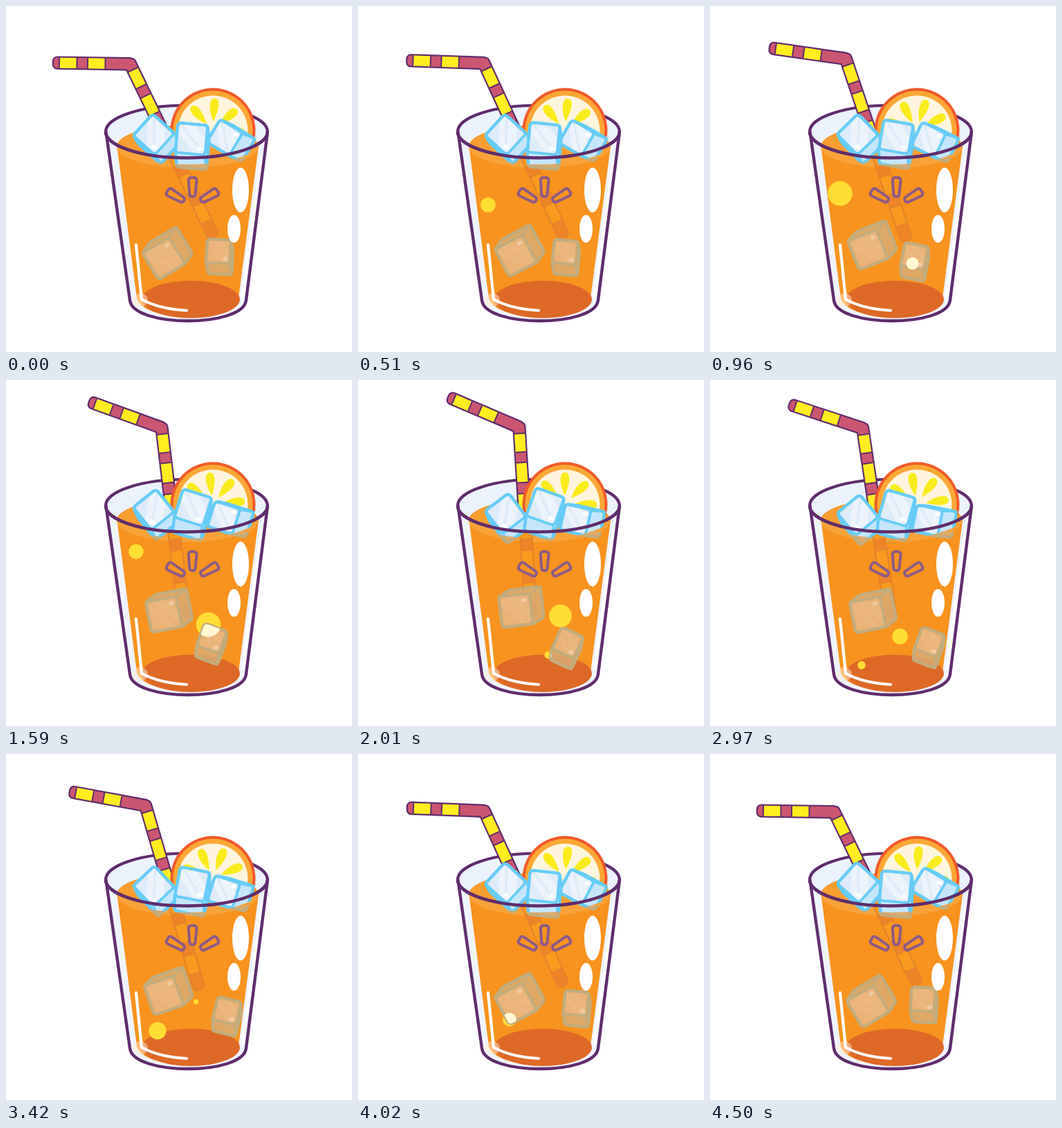
Animation, 500 px wide and 500 px high, one loop 4.53 s. Source, as an HTML page with a canvas:

```html
<!DOCTYPE html>
<html lang="en">
<head>
<meta charset="utf-8">
<title>Iced orange drink</title>
<style>
html, body { margin: 0; width: 100%; height: 100%; overflow: hidden; background: #fff; }
canvas { display: block; width: 500px; height: 500px; }
</style>
</head>
<body>
<canvas id="stage" width="500" height="500"></canvas>
<script>
const ctx = document.getElementById('stage').getContext('2d');
const LOOP = 4530, TAU = Math.PI * 2, DEG = Math.PI / 180;
const PURPLE = '#5f2d6c';
const STRAW_DRY = { line: PURPLE, red: '#cb5671', yellow: '#ffee1f' };
const STRAW_WET = { line: '#e5842b', red: '#ee8328', yellow: '#f89b1f' };
const ICE_DRY = { side: '#c5e6fa', front: '#deebf8', line: '#66ccf6', stripe: .4, glint: 1 };
const ICE_WET = { side: 'rgba(217,174,120,.8)', front: 'rgba(240,184,128,.7)', line: '#c3ac7c', stripe: .05, glint: .3 };

const mix = (a, b, k) => a + (b - a) * k;
const smoother = u => {
  u = Math.min(1, Math.max(0, u));
  return u * u * u * (10 + u * (6 * u - 15));
};
// 0 until start, 1 at peak, 0 again from end
const swing = (t, start, peak, end) =>
  t < peak ? smoother((t - start) / (peak - start)) : smoother((end - t) / (end - peak));

function at(x, y, deg, draw) {
  ctx.save();
  ctx.translate(x, y);
  ctx.rotate(deg * DEG);
  draw();
  ctx.restore();
}
function clipped(path, draw) {
  ctx.save();
  ctx.clip(path);
  draw();
  ctx.restore();
}
function oval(x, y, rx, ry, fill) {
  ctx.fillStyle = fill;
  ctx.beginPath();
  ctx.ellipse(x, y, rx, ry, 0, 0, TAU);
  ctx.fill();
}
function stroke(path, color, width) {
  ctx.strokeStyle = color;
  ctx.lineWidth = width;
  ctx.stroke(path);
}
function roundPoly(pts, r) {
  const p = new Path2D(), n = pts.length, last = pts[n - 1];
  p.moveTo((last[0] + pts[0][0]) / 2, (last[1] + pts[0][1]) / 2);
  pts.forEach((c, i) => p.arcTo(...c, ...pts[(i + 1) % n], r));
  p.closePath();
  return p;
}

const glass = new Path2D('M144.5 182 L179 425 C183 465 343 465 347 425 L378 182');
const glassBody = new Path2D('M144.5 182 L179 425 C183 465 343 465 347 425 L378 182 A117 38 0 0 1 144.5 182Z');
const liquid = new Path2D('M160.5 203 L189 422 C197 458 329 458 336 422 L365 203 Z');
const rim = new Path2D();
rim.ellipse(261, 181.5, 117, 38, 0, 0, TAU);
const frontRim = new Path2D();
frontRim.ellipse(261, 181.5, 117, 38, 0, 0, Math.PI);
const waterline = new Path2D();
waterline.rect(0, 0, 500, 190);
waterline.ellipse(262, 190, 112, 39, 0, 0, Math.PI);
const aboveWater = new Path2D('M0 0H500V196H0Z');
const belowWater = new Path2D('M0 219H500V500H0Z');

function strawPart(x, y, deg, length, bands, ink, layer) {
  at(x, y, deg, () => {
    const body = new Path2D();
    body.roundRect(0, -7.5, length, 15, 5);
    if (layer === 0) return stroke(body, ink.line, 4.4);
    ctx.fillStyle = ink.red;
    ctx.fill(body);
    for (const [from, to] of bands) {
      ctx.fillStyle = ink.line;
      ctx.fillRect(from - 1, -7.5, to - from + 2, 15);
      ctx.fillStyle = ink.yellow;
      ctx.fillRect(from + 1, -7.5, to - from - 2, 15);
    }
  });
}
function straw(k, ink) {
  at(246, 212, 22.3 * k, () => {
    ctx.translate(-246, -212);
    for (const layer of [0, 1]) {
      strawPart(69, 82, .9, 114.5, [[8, 33.5], [49, 74.5]], ink, layer);
      strawPart(177, 78.5, 64.2, 282,
        [[15, 42], [57, 86], [102, 126], [141, 168], [184, 212], [231, 259]], ink, layer);
    }
  });
}

function slice(k) {
  at(299, 180, 0, () => {
    oval(0, 0, 61.5, 61.5, '#f1592a');
    oval(0, 0, 57.5, 57.5, '#fca735');
    oval(0, 0, 50.5, 50.5, '#fff4dd');
    ctx.fillStyle = '#f9ec1d';
    const seed = new Path2D('M0 -13 C-5 -23 -7 -32 -6 -39 C-5 -49 6 -49 6.5 -39 C7 -32 4 -23 0 -13Z');
    for (let i = 0; i < 8; i++) at(0, 0, 3 + 42 * k + i * 45, () => ctx.fill(seed));
  });
}

// A square front face with a hull swept along the depth vector
function makeCube(half, dx, dy) {
  const corners = [[-1, -1], [1, -1], [1, 1], [-1, 1]].map(([a, b]) => [a * half, b * half]);
  const sx = Math.sign(dx), sy = Math.sign(dy);
  const hull = [];
  for (const [x, y] of corners) {
    const near = x * sx < 0 || y * sy < 0, far = x * sx > 0 || y * sy > 0;
    if (near) hull.push([x, y]);
    if (far) hull.push([x + dx, y + dy]);
  }
  const angle = p => Math.atan2(p[1] - dy / 2, p[0] - dx / 2);
  hull.sort((a, b) => angle(a) - angle(b));
  return { half, dx, dy, hull: roundPoly(hull, 5), front: roundPoly(corners, 5),
    edge: [sx * half, sy * half] };
}
function drawCube(cube, ink) {
  const { half: h, dx, dy, hull, front, edge: [ex, ey] } = cube;
  ctx.fillStyle = ink.side;
  ctx.fill(hull);
  ctx.fillStyle = ink.front;
  ctx.fill(front);
  clipped(front, () => {
    ctx.fillStyle = `rgba(255,255,255,${ink.stripe})`;
    ctx.rotate(-42 * DEG);
    ctx.fillRect(-h * .45, -2 * h, h * .4, 4 * h);
    ctx.fillRect(h * .12, -2 * h, h * .62, 4 * h);
  });
  const link = new Path2D();
  link.moveTo(ex - Math.sign(ex) * 1.5, ey - Math.sign(ey) * 1.5);
  link.lineTo(ex + dx, ey + dy);
  stroke(link, ink.line, 3);
  stroke(front, ink.line, 3.8);
  stroke(hull, ink.line, 4.4);
  ctx.globalAlpha = ink.glint;
  oval(ex * .62, ey * .62, 4, 3, '#fff');
  ctx.globalAlpha = 1;
}

const leftIce = makeCube(21, 15, 4), rightIce = makeCube(19, 20, -2), midIce = makeCube(21.5, 4, 21);
const bigIce = makeCube(22.3, 17, -8), smallIce = makeCube(17, 4, 16);

// x, reference height and time, speed, birth, lifetime, radius
const bubbles = [
  [188, 271, 960, 36.5, 140, 1820, 18],
  [292.5, 372, 960, 29.5, 585, 2250, 18],
  [274.5, 385, 2460, 28, 1780, 1800, 13],
  [219, 400, 3420, 27, 2710, 1790, 13.2]
];
function drawBubbles(t, color) {
  for (const [x, y, when, speed, birth, life, size] of bubbles) {
    const age = (t - birth) / life;
    if (age <= 0 || age >= 1) continue;
    const r = size * Math.sin(Math.PI * age);
    oval(x, y - (t - when) * speed / 1000, r, r, color);
  }
}
function deepCube(cube, x, y, deg, t) {
  at(x, y, deg, () => {
    drawCube(cube, ICE_WET);
    ctx.clip(cube.hull);
    ctx.setTransform(1, 0, 0, 1, 0, 0);
    drawBubbles(t, '#fff8d3');
  });
}

function surfaceIce(t, k) {
  const late = swing(t, 0, 2700, LOOP), dip = swing(t, 1200, 2520, 4430);
  const pieces = [
    [leftIce, 213.5, mix(185.5, 196, dip), mix(42, 53, k)],
    [rightIce, mix(316, 314, late), mix(190, 203.5, late), mix(31, 11, late)],
    [midIce, mix(268, 270.5, k), mix(192, 183, k), mix(5, 19.5, k)]
  ];
  const all = ink => pieces.forEach(([cube, x, y, deg]) => at(x, y, deg, () => drawCube(cube, ink)));
  clipped(belowWater, () => all(ICE_WET));
  clipped(waterline, () => all(ICE_DRY));
}

function sparks() {
  const dash = roundPoly([[-6.2, -14], [6.2, -14], [3.8, 13.5], [-3.8, 13.5]], 3.5);
  for (const [x, y, deg] of [[269.5, 262, 1], [245.5, 274.5, -60], [293.5, 274.5, 60]])
    at(x, y, deg, () => {
      ctx.fillStyle = '#f7941f';
      ctx.fill(dash);
      stroke(dash, '#8d5a88', 4);
    });
}

function draw(t) {
  const k = swing(t, 130, 2180, 4480), turn = TAU * t / LOOP, wave = (1 - Math.cos(turn)) / 2;
  ctx.fillStyle = '#fff';
  ctx.fillRect(0, 0, 500, 500);
  ctx.lineJoin = ctx.lineCap = 'round';

  ctx.fillStyle = '#eff3fc';
  ctx.fill(glassBody);
  oval(261, 181.5, 117, 38, '#ebf2fb');
  stroke(new Path2D('M370 218 L342 418'), '#fff', 5);
  ctx.fillStyle = '#f7931e';
  ctx.fill(liquid);
  oval(262.5, 203, 102.5, 31, '#f8a23a');
  clipped(rim, () => oval(262.5, 203, 102.5, 31, '#f89d30'));
  oval(267, 424, 71, 27, '#de6926');
  stroke(rim, PURPLE, 4.2);

  clipped(belowWater, () => straw(k, STRAW_WET));
  drawBubbles(t, '#ffde34');
  deepCube(bigIce, 228, mix(365, 332, wave), mix(-31, -6, wave), t);
  deepCube(smallIce, 307 - 12 * Math.sin(turn), 368 - 14 * Math.cos(turn - .25), mix(3, 25, wave), t);

  clipped(aboveWater, () => {
    straw(k, STRAW_DRY);
    slice(k);
  });
  surfaceIce(t, k);

  oval(194, 425, 11, 10, 'rgba(255,236,205,.5)');
  stroke(new Path2D('M188 345 L196 424 Q222 438 261 440'), '#fff', 4.2);
  oval(339, 266, 12, 32.5, '#fff');
  oval(329.5, 322, 9.5, 20, '#fff');
  sparks();
  stroke(glass, PURPLE, 4.4);
  stroke(frontRim, PURPLE, 4.4);
}

function tick() {
  draw(performance.now() % LOOP);
  requestAnimationFrame(tick);
}
tick();
</script>
</body>
</html>
```
